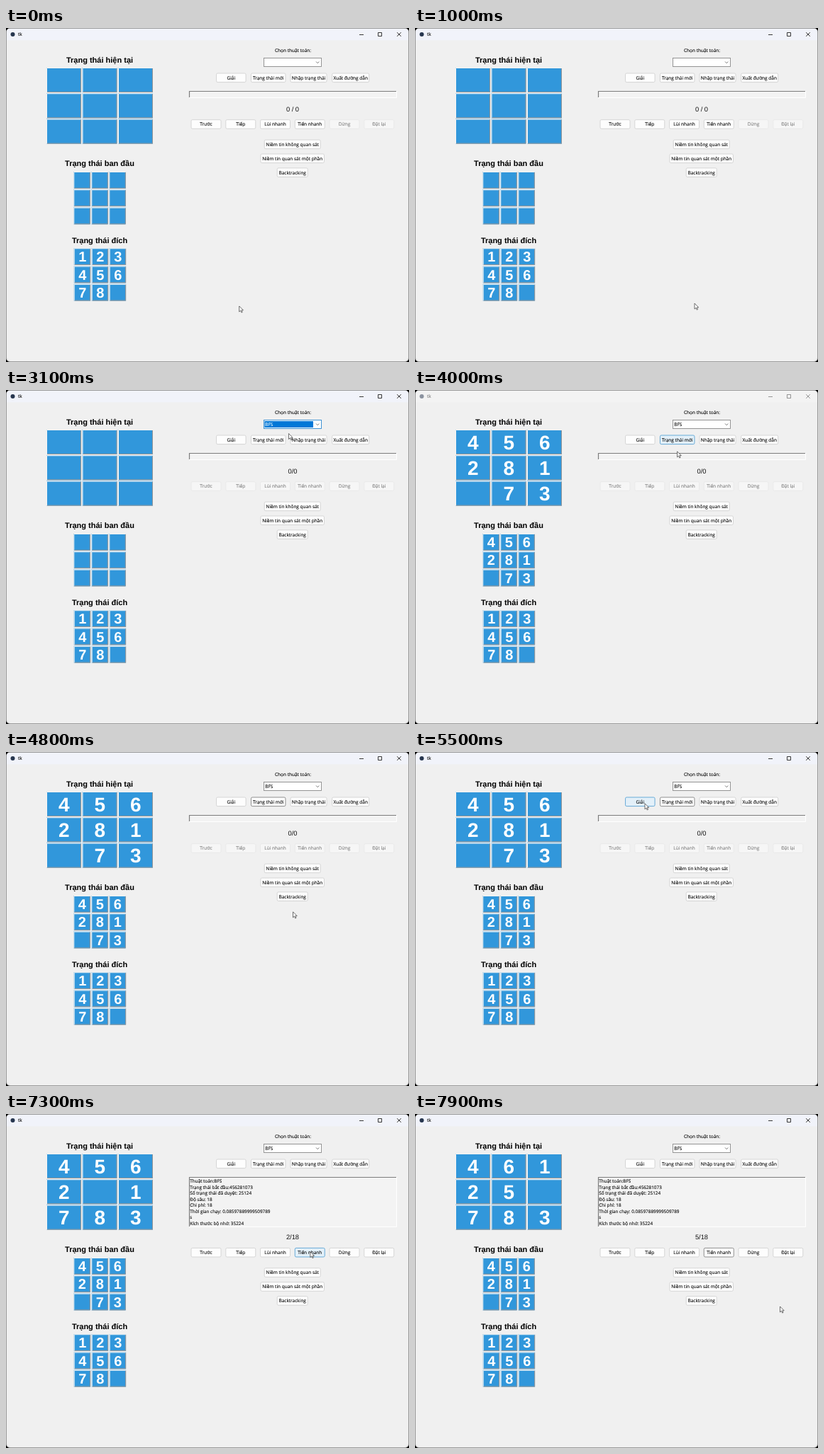
Animation of 568x472 px, one loop 8000 ms. Source, as an HTML page:

```html
<!DOCTYPE html>
<html lang="vi">
<head>
<meta charset="utf-8">
<title>tk</title>
<style>
html, body { margin: 0; width: 100%; height: 100%; overflow: hidden; background: #000; }
svg { display: block; width: 568px; height: 472px; }
text { text-rendering: geometricPrecision; white-space: pre; }
.ui { font-family: "Open Sans", "Noto Sans", sans-serif; font-size: 6.5px; fill: #000; stroke: #000; stroke-width: 0.1; }
.head { font: bold 11px "Liberation Sans", Arial, sans-serif; fill: #000; }
.digit { font-family: "Liberation Sans", Arial, sans-serif; font-weight: bold; fill: #fff; }
.count { font: 9.3px "Liberation Sans", Arial, sans-serif; fill: #111; }
.mid { text-anchor: middle; }
</style>
</head>
<body>
<svg id="stage" viewBox="0 0 568 472"></svg>
<script>
const LOOP = 8000;
const T = { pick: 2800, fresh: 3750, alertEnd: 4700, solve: 5850, play: 6950, step: 200 };
const stage = document.getElementById('stage');

function el(tag, attrs, parent = stage, content) {
  const node = document.createElementNS('http://www.w3.org/2000/svg', tag);
  set(node, attrs);
  if (content !== undefined) node.textContent = content;
  parent.appendChild(node);
  return node;
}
function set(node, attrs) {
  for (const key in attrs) node.setAttribute(key, attrs[key]);
}
function label(x, y, str, cls, parent) {
  return el('text', { x, y, class: cls }, parent, str);
}
function write(node, str) {
  if (node.textContent !== str) node.textContent = str;
}
function tint(text, color) {
  text.style.fill = text.style.stroke = color;
}
const during = (t, a, b) => t >= a && t < b;

// Window frame and title bar
el('rect', { x: 0.5, y: 0.5, width: 567, height: 471, rx: 5, fill: '#f0f0f0', stroke: '#9a9a9a' });
const bar = el('path', { d: 'M1 17.5V6Q1 1 6 1H562Q567 1 567 6V17.5Z' });
const caption = el('g', {});
el('circle', { cx: 9.5, cy: 9, r: 3, fill: '#27364f' }, caption);
label(17, 11.2, 'tk', 'ui', caption);
el('path', {
  d: 'M498 9.5H504M524.5 6.5H529.5V11.5H524.5ZM551.2 6.2L556.8 11.8M556.8 6.2L551.2 11.8',
  fill: 'none', stroke: '#222', 'stroke-width': 0.9
}, caption);

// Puzzle boards
function board(x, y, w, h, dx, dy, size) {
  return Array.from({ length: 9 }, (_, i) => {
    const g = el('g', { transform: `translate(${x + i % 3 * dx} ${y + Math.floor(i / 3) * dy})` });
    el('rect', { width: w, height: h, fill: '#3197db' }, g);
    el('path', { d: `M0.5 ${h}V0.5H${w}`, fill: 'none', stroke: '#f4f4f4' }, g);
    el('path', { d: `M1 ${h - 0.5}H${w - 0.5}V1`, fill: 'none', stroke: '#959595' }, g);
    const digit = label(w / 2 + 0.3, h / 2 + 0.3 + size * 0.35, '', 'digit mid', g);
    set(digit, { 'font-size': size });
    return digit;
  });
}
function fill(cells, digits) {
  cells.forEach((cell, i) => write(cell, digits[i] > 0 ? String(digits[i]) : ''));
}
label(132, 48.8, 'Trạng thái hiện tại', 'head mid');
label(132, 195.2, 'Trạng thái ban đầu', 'head mid');
label(132, 303.6, 'Trạng thái đích', 'head mid');
const current = board(57, 56, 49, 35, 50.5, 36.3, 28);
const initial = board(95.3, 203, 23.5, 23.8, 25, 25.3, 20);
const goal = board(95.7, 311.2, 23.4, 23.8, 25, 25.3, 20);
fill(goal, '123456780');

// Board after each slide of the blank cell
const START = '456281073';
const SLIDES = [1, -3, -3, 1, 3];
const states = [START];
SLIDES.forEach(move => {
  const cells = [...states[states.length - 1]];
  const blank = cells.indexOf('0');
  [cells[blank], cells[blank + move]] = [cells[blank + move], '0'];
  states.push(cells.join(''));
});

// Right panel
label(404.5, 34.2, 'Chọn thuật toán:', 'ui mid');
const combo = el('rect', { x: 363.5, y: 42.5, width: 81, height: 12, fill: '#fff' });
const picked = el('rect', { x: 364.5, y: 44, width: 68.5, height: 9, fill: '#0078d7' });
const choice = label(365.3, 50.9, '', 'ui');
el('path', { d: 'M437 47.5L439.2 49.7L441.4 47.5', fill: 'none', stroke: '#555', 'stroke-width': 0.8 });

const LOOKS = {
  normal: ['#fdfdfd', '#d2d2d2', '#000'],
  off: ['#f6f6f6', '#e8e8e8', '#7e7e7e'],
  hover: ['#e3f0f9', '#5ba3d4', '#000'],
  focus: ['#fdfdfd', '#858585', '#000'],
  ring: ['#fdfdfd', '#8088a8', '#000']
};
function button(cx, cy, w, str, parent) {
  const g = el('g', { transform: `translate(${cx} ${cy})` }, parent);
  const box = el('rect', { x: -w / 2, y: -6.3, width: w, height: 12.6, rx: 1.8, 'stroke-width': 0.9 }, g);
  const text = label(0, 2.3, str, 'ui mid', g);
  return look => {
    const [back, edge, ink] = LOOKS[look];
    set(box, { fill: back, stroke: edge });
    tint(text, ink);
  };
}
const solveBtn = button(317.3, 70.3, 41.5, 'Giải');
const freshBtn = button(369.7, 70.3, 48.5, 'Trạng thái mới');
button(426.5, 70.3, 51, 'Nhập trạng thái')('normal');
button(485.7, 70.3, 52, 'Xuất đường dẫn')('normal');

const logFill = el('rect', { x: 258, y: 89, width: 292.5, fill: '#f3f3f3' });
const logDark = el('path', { fill: 'none', stroke: '#7c7c7c', 'stroke-width': 1.2 });
const logLight = el('path', { fill: 'none', stroke: '#fff' });
const log = el('g', {});
['Thuật toán:BFS', 'Trạng thái bắt đầu:456281073', 'Số trạng thái đã duyệt: 25124',
 'Độ sâu: 18', 'Chi phí: 18', 'Thời gian chạy: 0.08597889999509789', 's',
 'Kích thước bộ nhớ: 35224'
].forEach((line, i) => {
  label(259.3, 97 + i * 8.53, line, 'ui', log).style.fontSize = '6.38px';
});

const lower = el('g', {});
const count = label(404, 117.8, '', 'count mid', lower);
const steps = ['Trước', 'Tiếp', 'Lùi nhanh', 'Tiến nhanh', 'Dừng', 'Đặt lại']
  .map((str, i) => button(282 + i * 48.75, 136, 42, str, lower));
button(403.7, 164.4, 79, 'Niềm tin không quan sát', lower)('normal');
button(403.7, 184.3, 89.5, 'Niềm tin quan sát một phần', lower)('normal');
button(403.7, 204.2, 43, 'Backtracking', lower)('normal');

// Pointer: time, x, y
const TRACK = [
  [0, 328.7, 393], [100, 329, 393], [500, 350, 415], [900, 392, 426], [1300, 400, 280],
  [1800, 424, 59], [2000, 419, 50], [2300, 430, 48], [2700, 408, 55], [2800, 399, 61],
  [3100, 398.5, 61.5], [3500, 374, 70], [3800, 368, 75], [4000, 369.5, 86.5],
  [4500, 420, 255], [4700, 420, 255], [5300, 328, 82], [5500, 324, 72.8], [5800, 324, 72.8],
  [6500, 336, 85], [6900, 428, 193], [7400, 429, 195], [7900, 514.5, 272], [8000, 515, 272]
];
const pointer = el('path', {
  d: 'M0 0V8L1.9 6.3L3.2 9.1L4.5 8.5L3.2 5.8H5.7Z',
  fill: '#fff', stroke: '#333', 'stroke-width': 0.7, 'stroke-linejoin': 'round'
});
function pointerAt(t) {
  const i = TRACK.findIndex(p => p[0] > t);
  const [t0, x0, y0] = TRACK[i - 1], [t1, x1, y1] = TRACK[i];
  const u = (t - t0) / (t1 - t0);
  return [x0 + (x1 - x0) * u, y0 + (y1 - y0) * u];
}

function stepLook(i, t) {
  if (t < T.pick) return i < 4 ? 'normal' : 'off';
  if (t < T.solve) return 'off';
  if (i === 3 && during(t, 6850, 7460)) return 'hover';
  if (t < T.play) return i === 1 || i === 3 ? 'normal' : 'off';
  return i === 3 ? 'focus' : 'normal';
}

function draw(t) {
  const inactive = during(t, T.fresh, T.alertEnd);
  set(bar, { fill: inactive ? '#f3f3f3' : '#f1f3fa' });
  set(caption, { opacity: inactive ? 0.5 : 1 });

  const step = Math.max(0, Math.min(SLIDES.length, Math.floor((t - T.play) / T.step) + 1));
  fill(current, t < T.fresh ? '000000000' : states[step]);
  fill(initial, t < T.fresh ? '000000000' : START);

  const selected = during(t, T.pick, T.fresh);
  set(combo, { stroke: selected ? '#2b88d0' : '#8a8a8a', 'stroke-width': 0.9 });
  set(picked, { visibility: selected ? 'visible' : 'hidden' });
  write(choice, t < T.pick ? '' : 'BFS');
  tint(choice, selected ? '#fff' : '#000');

  solveBtn(during(t, 5400, 6300) ? 'hover' : during(t, 6300, T.play) ? 'ring' : 'normal');
  freshBtn(during(t, 3450, T.alertEnd) ? 'hover' : during(t, T.alertEnd, T.solve) ? 'focus' : 'normal');

  const solved = t >= T.solve;
  const bottom = solved ? 159.5 : 98.5;
  set(logFill, { height: bottom - 89 });
  set(logDark, { d: `M258.5 ${bottom}V89.5H550` });
  set(logLight, { d: `M258 ${bottom}H550.5V89` });
  set(log, { visibility: solved ? 'visible' : 'hidden' });
  set(lower, { transform: `translate(0 ${solved ? 59.7 : 0})` });
  write(count, t < T.pick ? '0 / 0' : solved ? `${step}/18` : '0/0');
  steps.forEach((paint, i) => paint(stepLook(i, t)));

  set(pointer, { transform: `translate(${pointerAt(t)})` });
}

function tick() {
  draw(performance.now() % LOOP);
  requestAnimationFrame(tick);
}
tick();
</script>
</body>
</html>
```
